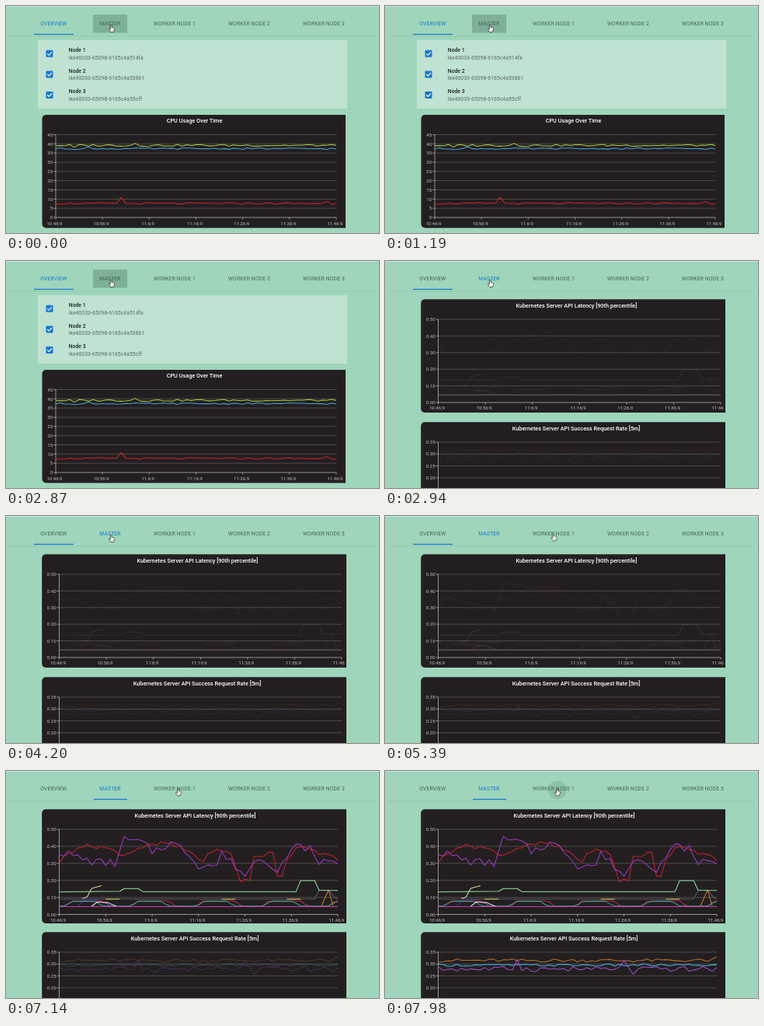
These frames come from a looping animation (480x292 px, 8000 ms). An HTML page:

```html
<!DOCTYPE html>
<html lang="en">
<head>
<meta charset="utf-8">
<title>Cluster dashboard</title>
<style>
  html, body { margin: 0; width: 100%; height: 100%; overflow: hidden; background: #9ed5bb; }
  svg { display: block; font-family: Roboto, sans-serif; }
  svg * { animation-duration: 8s; animation-iteration-count: infinite; animation-timing-function: linear; }

  .tab { font-size: 6.7px; letter-spacing: .2px; fill: #446255; text-anchor: middle; }
  .node { font-size: 6.8px; font-weight: 500; fill: #17231d; }
  .id { font-size: 6.75px; letter-spacing: .08px; fill: #566b60; }
  .title { font-size: 7.3px; font-weight: 500; fill: #fff; text-anchor: middle; }
  .tick { font-size: 6.1px; fill: #c4c2c2; }
  .card { fill: #231f20; }
  .grid { stroke: #5b5758; stroke-width: .8; }
  .axis { stroke: #b5b2b2; stroke-width: .8; fill: none; }
  .line { fill: none; stroke-width: 1.05; stroke-linejoin: round; }

  .overview, .loading, .loaded, .t0, .t1 { animation-timing-function: step-end; }
  .overview { animation-name: overview; }
  .loading { animation-name: loading; }
  .loaded { animation-name: loaded; }
  .t0 { animation-name: tabOff; }
  .t1 { animation-name: tabOn; }
  .faint { animation-name: faint; }
  .fade1 { animation-name: fade1; }
  .fade2 { animation-name: fade2; }
  #bar { animation-name: slide; }
  #hand { animation-name: point; }
  #ripple { animation-name: ripple; transform-box: fill-box; transform-origin: center; }

  @keyframes overview { 0% { opacity: 1 } 36.75%, 100% { opacity: 0 } }
  @keyframes loading { 0% { opacity: 0 } 36.75% { opacity: 1 } 82.25%, 100% { opacity: 0 } }
  @keyframes loaded { 0% { opacity: 0 } 82.25%, 100% { opacity: 1 } }
  @keyframes tabOff { 0% { fill: #1976d2 } 36.75%, 100% { fill: #446255 } }
  @keyframes tabOn { 0% { fill: #40604f } 36.75%, 100% { fill: #1976d2 } }
  @keyframes faint { 0%, 52.5% { opacity: .09 } 56.9%, 100% { opacity: .12 } }
  @keyframes fade1 { 0%, 82.25% { opacity: .12 } 87.5%, 100% { opacity: 1 } }
  @keyframes fade2 { 0%, 86% { opacity: .12 } 89.25% { opacity: .28 } 94.5%, 100% { opacity: 1 } }
  @keyframes slide {
    0%, 82.25% { x: 36px; width: 51px; animation-timing-function: cubic-bezier(.4, 0, .2, 1) }
    86%, 100% { x: 113px; width: 43px }
  }
  @keyframes point {
    0%, 59.5% { transform: translate(136px, 29px); animation-timing-function: ease-in-out }
    66.5%, 71.75% { transform: translate(217.5px, 27.3px); animation-timing-function: ease-in-out }
    77%, 100% { transform: translate(222px, 27.3px) }
  }
  @keyframes ripple {
    0%, 97.9% { opacity: 0; transform: scale(.3) }
    98% { opacity: .4; transform: scale(.35) }
    99.75%, 100% { opacity: 1; transform: scale(1) }
  }
</style>
</head>
<body>
<svg id="stage" width="480" height="292" viewBox="0 0 480 292"></svg>
<script>
const round = n => Math.round(n * 100) / 100;
const text = (cls, x, y, s, extra = '') => `<text class="${cls}" x="${round(x)}" y="${round(y)}" ${extra}>${s}</text>`;
const seg = (cls, x1, y1, x2, y2) => `<path class="${cls}" d="M${round(x1)} ${round(y1)}L${round(x2)} ${round(y2)}"/>`;
const group = (cls, ...parts) => `<g class="${cls}">${parts.join('')}</g>`;

// Series are lists of [minute, value] points over one hour.
const hour = f => Array.from({ length: 61 }, (_, m) => [m, f(m)]);
const noise = (seed, i) => {
  const n = Math.sin(i * 12.9898 + seed * 78.233) * 43758.5453;
  return (n - Math.floor(n)) * 2 - 1;
};
const jitter = (seed, base, amp, bumps = {}) => hour(m => base + (bumps[m] ?? amp * noise(seed, m)));
const wander = (seed, amp, keys) => hour(m => {
  const k = Math.max(1, keys.findIndex(([t]) => t >= m));
  const [[t0, v0], [t1, v1]] = [keys[k - 1], keys[k]];
  return v0 + (v1 - v0) * (m - t0) / (t1 - t0) + amp * noise(seed, m);
});
const humps = (base, top, center, duty) => hour(m => {
  const wave = duty + 1.6 * Math.cos(2 * Math.PI * (m - center) / 14.2);
  return base + (top - base) * Math.min(1, Math.max(0, wave));
});

function chart({ card, title, titleX, titleY, x0, x1, top, bottom, max, step, digits, labelY, fade = '', series }) {
  const [left, cardTop, right, cardBottom] = card;
  const X = m => x0 + (x1 - x0) * m / 60;
  const Y = v => bottom - (bottom - top) * v / max;
  let out = `<path class="card" d="M${right} ${cardTop}V${cardBottom}H${left + 5}a5 5 0 0 1-5-5V${cardTop + 5}a5 5 0 0 1 5-5z"/>`;
  out += text('title', titleX, titleY, title);
  for (let k = 0; k <= Math.round(max / step); k++) {
    const y = Y(k * step);
    if (k) out += seg('grid', x0, y, x1, y);
    out += seg('axis', x0 - 3, y, x0, y);
    out += text('tick', x0 - 3.8, y + 2.2, (k * step).toFixed(digits), 'text-anchor="end"');
  }
  out += `<path class="axis" d="M${x0} ${top}V${bottom}H${x1}"/>`;
  for (let m = 0; m <= 60; m += 10) {
    const x = X(m), t = 46 + m;
    const label = `${10 + Math.floor(t / 60)}:${t % 60}:9`;
    out += seg('axis', x, bottom, x, bottom + 2.5);
    // A label past the card's edge loses its tail.
    out += text('tick', x - label.length * 1.66, labelY, x + 10 > right ? label.slice(0, 5) : label);
  }
  const lines = series.map(([color, points]) =>
    `<polyline class="line" stroke="${color}" points="${points.map(([m, v]) => round(X(m)) + ',' + round(Y(v))).join(' ')}"/>`);
  return out + group(fade, ...lines);
}

const cpu = chart({
  card: [46.5, 140, 437, 285.5], title: 'CPU Usage Over Time', titleX: 242.5, titleY: 150,
  x0: 64, x1: 425, top: 165.5, bottom: 272, max: 45, step: 5, digits: 0, labelY: 282,
  series: [
    ['#a5c83c', jitter(3, 39.2, .55, { 4: -1, 17: 1.1 })],
    ['#3fa3dc', jitter(8, 37.4, .4, { 7: .9 })],
    ['#c9252b', jitter(5, 7.6, .4, { 14: 3.2, 58: 1.1 })]
  ]
});

const flat = (value, from = 0, to = 60) => [[from, value], [to, value]];
const latencySeries = [
  ['#5d5a63', [[0, 9], [55, 9], [56, 14.3], [58, 14.3], [59.4, 9.8], [60, 9]]],
  ['#34349a', [[4, 4.8], [5.5, 9], [8, 8.6], [12, 4.8]]],
  ['#c41f52', humps(4.8, 8, 6, .9)],
  ['#2fa793', humps(4.9, 7.7, 5.3, .3)],
  ['#e9dfe2', [[7, 4.8], [8.2, 7.3], [10.5, 6.9], [12.3, 4.8]]],
  ...[10, 35, 49].map(m => ['#d9cf54', flat(9, m, m + 3)]),
  ['#c07a2c', [[56.5, 5], [58, 14.4], [59, 5]]],
  ['#c23fae', flat(4.6)],
  ['#d8dca0', [[5, 9.3], [6, 10.3], [7, 15.3], [9.1, 16.9]]],
  ['#8fe3a2', [[0, 13.2], [13, 13.6], [14, 15.2], [17, 15.2], [18, 13.4], [51, 13.4], [52, 19.9], [55, 19.9], [56, 14.2], [60, 14]]],
  ['#c0222c', wander(4, 1.3, [[0, 31], [4, 40], [9, 40], [14, 35], [17, 39], [23, 42], [28, 37], [31, 31],
    [33, 38], [37, 36], [39, 20], [41, 20], [42, 34], [46, 36], [47, 22], [48, 23], [49, 33], [52, 41], [60, 32]])],
  ['#9a3bc2', wander(7, 2.4, [[0, 37], [7, 31], [12, 30], [14, 44], [18, 42], [20, 37], [24, 42], [27, 38], [30, 29],
    [34, 29], [35, 36], [40, 23], [43, 34], [47, 27], [51, 40], [54, 39], [55, 32], [60, 30]])]
].map(([color, points]) => [color, points.map(([m, v]) => [m, v / 100])]);

const rateSeries = [
  ['#b5702c', jitter(2, .315, .007, { 60: .016 })],
  ['#43aee3', jitter(6, .295, .005)],
  ['#a44bc8', jitter(9, .279, .011, { 17: .04, 40: .036, 42: -.022 })]
];

// Axis extents are wider while loading and settle once the data is in.
function charts(loaded) {
  const shared = { x0: 68.5, x1: loaded ? 427 : 432, digits: 2 };
  const baseline = loaded ? '' : '<path d="M68.5 172.3H432" stroke="#94757d" stroke-width=".8"/>';
  return chart({
    ...shared, card: [46.2, 49.2, 438, loaded ? 196 : 195], title: 'Kubernetes Server API Latency [90th percentile]',
    titleX: loaded ? 243.5 : 246.3, titleY: 59.8, top: 75, bottom: loaded ? 184.5 : 182, max: .5, step: .1,
    labelY: loaded ? 194 : 191.3, fade: loaded ? 'fade1' : 'faint', series: latencySeries
  }) + baseline + chart({
    ...shared, card: [46.2, 207.3, 438, 354], title: 'Kubernetes Server API Success Request Rate [5m]',
    titleX: loaded ? 243 : 246, titleY: 217.6, top: 233, bottom: 340, max: .35, step: .05,
    labelY: 350, fade: loaded ? 'fade2' : 'faint', series: rateSeries
  });
}

const nodes = ['514fa', '53861', '55cff'].map((id, i) => {
  const y = 61.3 + i * 26.6;
  return `<rect x="51.5" y="${y - 4.5}" width="9" height="9" rx="1.2" fill="#1976d2"/>
    <path d="M53.2 ${y}l2 2 3.8-4" fill="none" stroke="#fff" stroke-width="1.1"/>` +
    text('node', 80.8, y - 2.2, `Node ${i + 1}`) + text('id', 80.8, y + 7.3, `lke40033-65098-6165c4a${id}`);
}).join('');

const tabs = [['OVERVIEW', 61.3], ['MASTER', 134], ...[1, 2, 3].map(n => [`WORKER NODE ${n}`, 121 + 96 * n])]
  .map(([label, x], i) => text(`tab t${i}`, x, 25.1, label)).join('');

document.getElementById('stage').innerHTML = `
  <rect width="480" height="292" fill="#9ed5bb"/>
  <path d="M0 .5H480" stroke="#cdeadd"/>
  <path d="M4 38.7H476" stroke="#8fc5ab" stroke-width=".7"/>` +
  group('overview',
    '<rect x="112" y="11" width="44" height="23.5" fill="#3c6450" opacity=".32"/>',
    '<rect x="41" y="44" width="398" height="88" fill="#c0e2d0"/>',
    nodes, cpu) +
  group('loading', charts(false)) +
  group('loaded', charts(true)) +
  `<circle id="ripple" cx="221.7" cy="24.5" r="12" fill="#3c6450" fill-opacity=".17"/>` + tabs +
  `<rect id="bar" x="36" y="35.8" width="51" height="1.2" fill="#1976d2"/>
  <g id="hand"><path d="M-1.6-4.4c0-1 1.5-1 1.5 0v2.6l2.6.6q1.2.3 1 1.5l-.6 2.6-.6 1.6h-3.5l-2.3-3.4c-.5-.9.5-1.5 1.1-.8l.8.8z"
    fill="#fff" stroke="#222" stroke-width=".7" stroke-linejoin="round"/></g>`;
</script>
</body>
</html>
```
